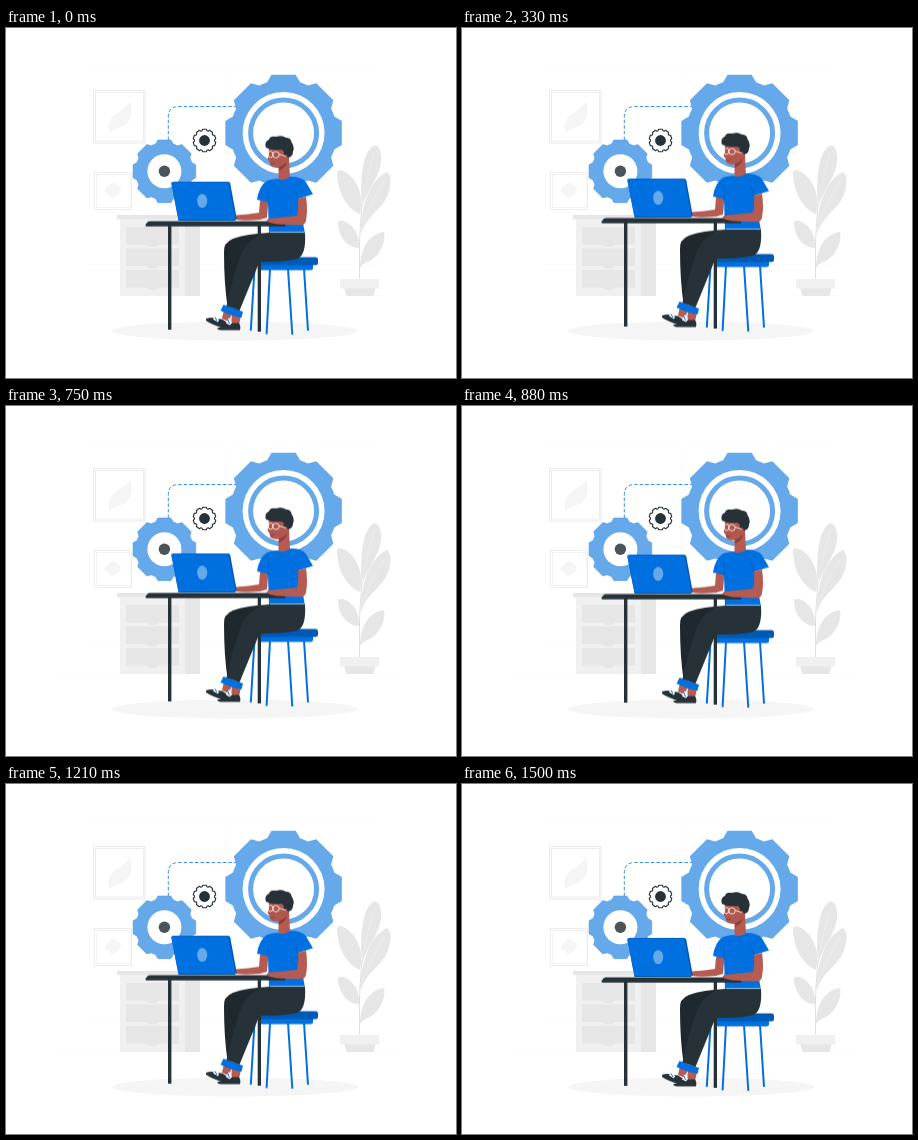
Write an HTML page that moves like this. It is 450 by 350 pixels and loops after 1540 ms.

```html
<!DOCTYPE html>
<html lang="en">
<head>
<meta charset="utf-8">
<title>Working at a desk</title>
<style>
  html, body { margin: 0; width: 100%; height: 100%; overflow: hidden; background: #fff; }
  svg { display: block; width: 450px; height: 350px; }
  #worker { animation: float 1540ms linear infinite; }
  @keyframes float {
    0%, 100% { transform: translateY(-.35px); }
    46.1% { transform: translateY(-7px); }
    94.8% { transform: translateY(0); }
  }
  .blue { fill: #0070e0; }
  .deep { fill: #005ab3; }
  .pale { fill: #66a9eb; }
  .dark { fill: #263238; }
  .skin { fill: #b55b52; }
  .g1 { fill: #f0f0f0; }
  .g2 { fill: #e6e6e6; }
  .g3 { fill: #f5f5f5; }
  .white { fill: #fff; }
  .line { fill: none; stroke-linejoin: round; }
</style>
</head>
<body>
<svg viewBox="0 0 450 350">
  <!-- room -->
  <g fill="none" stroke="#ebebeb" stroke-width=".18">
    <rect x="76.700" y="38.300" width="142.500" height="198" rx="3"/>
    <rect x="222" y="38.300" width="150" height="198" rx="3"/>
    <path d="M50 267.800H400"/>
  </g>

  <g fill="#fff" stroke="#e9e9e9">
    <rect x="87.500" y="62.500" width="51.500" height="52.500" stroke-width="1"/>
    <rect x="89.500" y="64.500" width="48" height="48.500" stroke-width=".8"/>
    <rect x="88.500" y="144.500" width="37" height="37" stroke-width=".8"/>
    <rect x="90.500" y="146.500" width="33.500" height="33" stroke-width=".6"/>
  </g>
  <path class="g3" d="M104 105C100 97 104 90 111 85C117 81 122 78 124 73C127 83 126 92 119 97C113 101 108 100 104 105Z"/>
  <path class="g3" d="M107 154.500Q110 155 111 158Q115 159 115 162.500Q114 166 111 167Q109 170 107 170Q104 170 103 167Q99 166 99 162.500Q99 159 103 158Q104 155 107 154.500Z"/>

  <!-- cabinet -->
  <path class="g1" d="M114 191H180V268H114Z"/>
  <path class="g2" d="M111 187H194V268H179V191H111Z"/>
  <g class="g2">
    <path id="drawer" d="M120 199H173V216.500H153Q151 219 146.500 219Q142 219 140 216.500H120Z"/>
    <use href="#drawer" y="21.500"/>
    <use href="#drawer" y="43"/>
  </g>

  <!-- plant -->
  <g class="g2">
    <path d="M356 180C354 158 355 126 367 118C371 115 376 122 375 133C374 149 361 162 356 180Z"/>
    <path d="M355 206C354 186 361 153 381 144C387 148 385 164 378 174C370 185 360 190 355 206Z"/>
    <path d="M354 186C341 181 331 164 331 144C333 139 344 145 350 155C356 165 356 176 354 186Z"/>
    <path d="M353 220C341 220 332 208 332 194C336 190 346 196 350 204C353 210 353 215 353 220Z"/>
    <path d="M354 240C354 224 361 206 378 204C380 213 375 224 368 230C362 235 356 235 354 240Z"/>
    <path d="M338 260H369.500L367.500 268H340.500Z"/>
  </g>
  <path class="line" d="M353.500 252V215C354 200 355 190 356 176" stroke="#e0e0e0" stroke-width="1"/>
  <path class="line" d="M356 176Q361 148 368 126M355 202Q365 172 379 152" stroke="#f0f0f0" stroke-width=".6"/>
  <rect class="g1" x="334" y="251" width="39" height="9.500"/>

  <ellipse class="g3" cx="229" cy="303" rx="123" ry="9.500"/>

  <!-- gears -->
  <path class="line" d="M162.300 112V89Q162.300 78.500 172.800 78.500H231" stroke="#3a8fe6" stroke-dasharray="3.500 2.100"/>
  <path class="pale" data-gear="277.600 105 59.500 53.300 8"/>
  <circle class="white" cx="277.600" cy="105" r="41"/>
  <circle cx="277.600" cy="105" r="33" fill="#fff" stroke="#66a9eb" stroke-width="5"/>
  <path data-gear="158.400 143.300 32 28.700 8" fill="#66a9eb" stroke="#4a94dd" stroke-width=".5"/>
  <circle class="white" cx="158.400" cy="143.300" r="17"/>
  <circle cx="158.400" cy="143.300" r="5.700" fill="#4b5458"/>
  <path data-gear="198.500 112.500 11.400 10 10" fill="#fff" stroke="#263238" stroke-width="1.100" stroke-linejoin="round"/>
  <circle class="dark" cx="198.500" cy="112.500" r="5.400"/>

  <g id="worker">
    <!-- stool -->
    <path class="line" d="M248.500 241L244.800 303M264 241L260.600 306.500M282 241L286.300 307M298 241L302 303" stroke="#0070e0" stroke-width="2"/>
    <path class="blue" d="M254 236H307V240Q307 242.500 304.500 242.500H254Z"/>
    <path class="deep" d="M254 229.500H309.500Q312 229.500 312 232V235Q312 237.500 309.500 237.500H254Z"/>

    <!-- feet -->
    <path class="skin" d="M218 282L226 285L223 294L216 291ZM226 286L235 288L233 297H225Z"/>
    <path class="dark" d="M200 291Q205 289 211 291L216 291.500L223 296L221 300H216Q206 297 200 293Z"/>
    <path class="white" d="M207 291.500L209 288.500L213 292L212 294.500Z"/>
    <path class="line" d="M209 289.500L211 293" stroke="#0070e0"/>
    <path class="dark" d="M211 300.500Q217 299 221 295.500H233Q235 298 234 302.500H215Q212 302.500 211 300.500Z"/>
    <path class="white" d="M220 295.500L223 290L226 295L224 297.500Z"/>
    <path class="line" d="M222 292L223.500 296" stroke="#0070e0"/>
    <path class="blue" d="M217.500 277L237 284L235.500 290L225 287.500L214.500 283Z"/>

    <!-- torso -->
    <path class="skin" d="M272.500 135L283 130L284 151Q278 156 272.500 152Z"/>
    <path class="skin" d="M254 173L262.500 172L261 190L254 192Q238 193.500 230 192V187.500Q243 186.500 253 185Z"/>
    <path class="blue" d="M271 151Q278 154 284.500 149Q296 149 300 154.500L307 166.500L292.500 171L299 206H263L262 174.500L251 172Q253 158 261 153Q265 151.500 271 151Z"/>
    <path class="line" d="M262.500 176L261.500 163M291.500 171L289 162" stroke="#005ab3" stroke-width=".6"/>

    <!-- legs -->
    <path fill="#1e282d" d="M266 205Q240 206 227 211Q217 215 218 225Q218 255 221.500 279L231 280L251 232Z"/>
    <path class="dark" d="M299 205H266Q248 206 239 219Q231 231 220.500 278L233.500 283L253.500 234Q279 234 290 231.500Q300.500 229 299 205Z"/>
    <path class="line" d="M264 204.600H298.500" stroke="#d9e6f2" stroke-width=".7"/>

    <!-- head -->
    <path d="M262.500 117L282 119L283 131Q280 138 273 139.500Q267 140.500 264.500 138L263.500 134L261.500 131L263 127Z" fill="#b0574e"/>
    <path fill="#8c3f39" d="M273 139.500Q278 138 281 134Q280 140 273 143Z"/>
    <path class="dark" d="M260 120Q258 114 263 112Q264 108 270 109Q276 107 280 110Q285 110 285.500 114.500Q289 119 287 124Q287 129 282 130L277.500 127Q279 123 275 122Q266 123 260 120Z"/>
    <ellipse class="skin" cx="279.500" cy="129.500" rx="2" ry="2.500"/>
    <g class="line" stroke="#fbe9e7" stroke-width=".9">
      <ellipse cx="264.500" cy="126.700" rx="2.300" ry="3.200"/>
      <circle cx="270" cy="127" r="3.200"/>
      <path d="M273.200 126.500L279.500 128.500"/>
    </g>
    <path class="line" d="M264.500 135.500Q267 136.500 268.500 135" stroke="#7d332e" stroke-width=".7"/>

    <!-- desk -->
    <path class="dark" d="M162 197H165.400V302H162ZM251.700 197H255V304H251.700Z"/>
    <path class="dark" d="M139.500 197L141.500 194.500Q142.500 193.500 144 193.500H275Q277 193.500 278 195L279.500 197.500Q279.500 198.700 278 198.700H140.500Q139 198.700 139.500 197Z"/>

    <!-- laptop -->
    <path class="deep" d="M165.300 155.500Q165.300 154 167.500 154H222Q223.700 154 224.200 155.500L230.700 191L229 193H172.500Z"/>
    <path class="blue" d="M165.500 156Q165.500 154.500 168 154.500H220.500Q222.200 154.500 222.600 156L229.500 192H172.500Z"/>
    <ellipse class="pale" cx="196.200" cy="173.200" rx="5" ry="7"/>

    <!-- near arm -->
    <path class="skin" d="M292 171L300 169Q302 182 300 193Q299 197.500 294 197.500L271 196.500Q264 195.500 260 193.500L262 191L273 190L291 188Q293 180 292 171Z"/>
  </g>
</svg>
<script>
  // Flat teeth at radius `tip` with rounded valleys at radius `root`.
  function gearPath(cx, cy, tip, root, teeth) {
    const step = 360 / teeth;
    const at = (r, deg) => {
      const a = (deg - 90) * Math.PI / 180;
      return (cx + r * Math.cos(a)).toFixed(2) + ' ' + (cy + r * Math.sin(a)).toFixed(2);
    };
    let d = '';
    for (let i = 0; i < teeth; i++) {
      const a = i * step;
      d += (i ? 'L' : 'M') + at(tip, a - step * .26) + 'L' + at(tip, a + step * .26) +
           'L' + at(root, a + step * .4) + 'A' + root + ' ' + root + ' 0 0 1 ' + at(root, a + step * .6);
    }
    return d + 'Z';
  }
  for (const gear of document.querySelectorAll('[data-gear]')) {
    gear.setAttribute('d', gearPath(...gear.dataset.gear.split(' ').map(Number)));
  }
</script>
</body>
</html>
```
